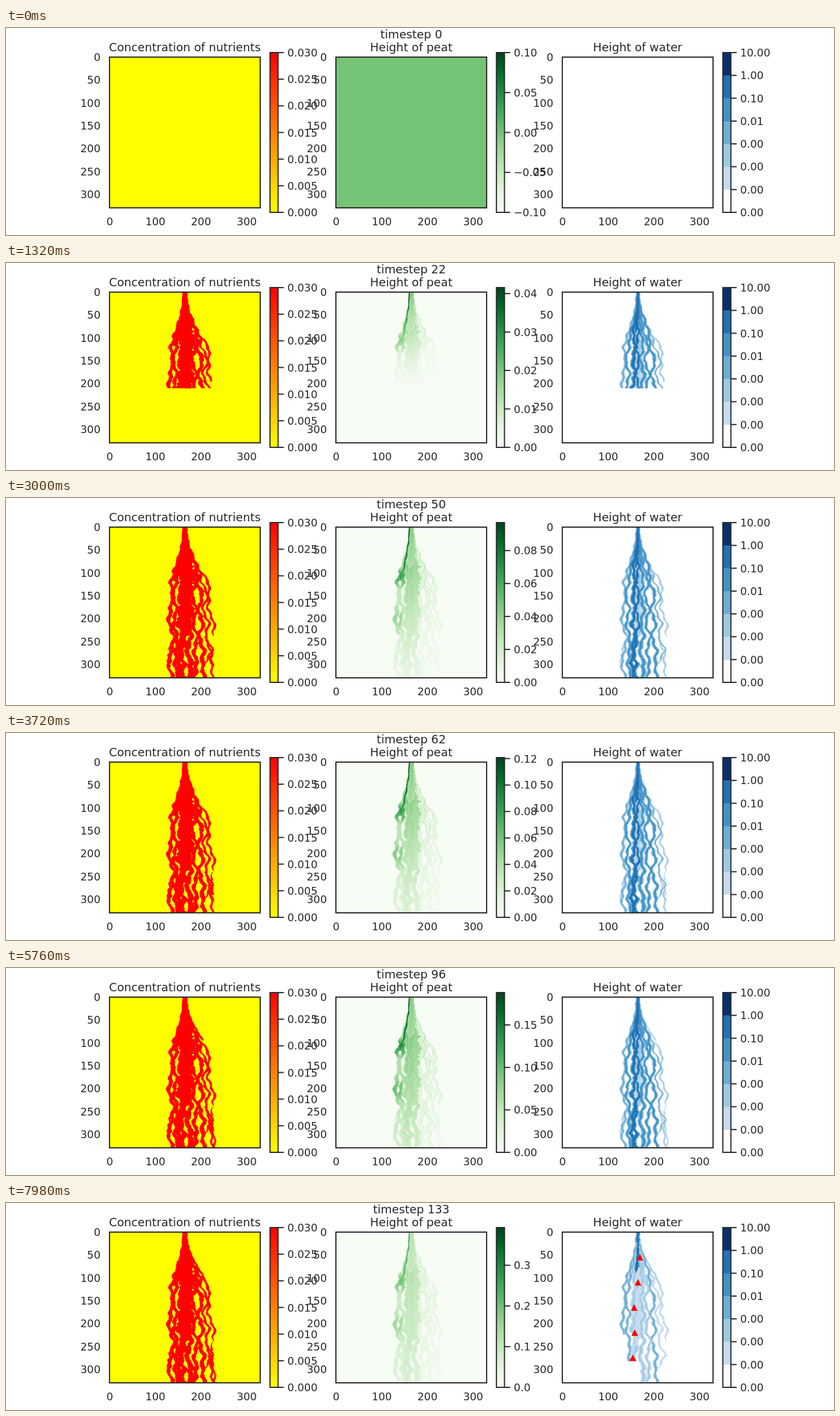
Write an HTML page with a canvas that moves like this. It is 1280x320 px and loops after 8000 ms.

```html
<!DOCTYPE html>
<html lang="en">
<head>
<meta charset="utf-8">
<title>Peat growth</title>
<style>
  html, body { margin: 0; width: 100%; height: 100%; overflow: hidden; background: #fff; }
  canvas, svg { position: absolute; left: 0; top: 0; width: 1280px; height: 320px; }
  text { font: 16.3px "DejaVu Sans", sans-serif; fill: #262626; white-space: pre; }
  .title { font-size: 17.8px; }
  .line { fill: none; stroke: #262626; stroke-width: 1.8; }
</style>
</head>
<body>
<canvas id="maps" width="1280" height="320"></canvas>
<svg id="axes" viewBox="0 0 1280 320"></svg>
<script>
const LOOP = 8000, STEP = 60;
const SIDE = 233, TOP = 45, CELL = SIDE / 330, ROW = SIDE / 11;
const LEFT = [160, 510, 860];
const BAR = { top: 38, height: 247, width: 12.4, offset: 248.2 };
const GREENS = ['#f7fcf5', '#e5f5e0', '#c7e9c0', '#a1d99b', '#74c476', '#41ab5d', '#238b45', '#006d2c', '#00441b'];
const BLUES = ['#fffafa', '#c6dbef', '#9ecae1', '#6baed6', '#4292c6', '#2171b5', '#08306b'];
const DAM_STEP = 100;
const DAM_X = [980, 977, 971, 972, 969];

const ctx = document.getElementById('maps').getContext('2d');
const axes = document.getElementById('axes');

// ---------- helpers ----------
const clamp = (v, a, b) => Math.min(b, Math.max(a, v));
const mix = (a, b, k) => a + (b - a) * k;
const rgb = hex => [1, 3, 5].map(i => parseInt(hex.slice(i, i + 2), 16));
const greenStops = GREENS.map(rgb);

function green(v) {
  const p = clamp(v, 0, 1) * (GREENS.length - 1);
  const i = Math.min(GREENS.length - 2, Math.floor(p));
  const c = greenStops[i].map((a, n) => Math.round(mix(a, greenStops[i + 1][n], p - i)));
  return `rgb(${c})`;
}

function random(seed) {
  return () => {
    seed = (seed * 1664525 + 1013904223) >>> 0;
    return seed / 4294967296;
  };
}

// ---------- channels ----------
// xs: offsets from the centre line, one per row; water: levels before, soon after and long after the dams.
const channels = [];

function channel(xs, options) {
  const c = { row: 0, width: 5, rate: .0008, water: [3, 3, 2], start: 0, speed: 6.75,
              cut: SIDE, hollow: false, wiggle: 1.5, bumps: false, ...options };
  const rnd = random(channels.length * 977 + 41);
  const phase = rnd() * 6.28;
  c.y0 = c.row * ROW;
  c.y1 = c.y0 + (xs.length - 1) * ROW;
  c.edge = [];
  let a = 0, b = 0;
  for (let y = c.y0; y <= c.y1 + .1; y += 1.5) {
    const p = (y - c.y0) / ROW;
    const i = Math.min(xs.length - 2, Math.floor(p));
    const spread = Math.min(1, y / 60);
    const x = mix(xs[i], xs[i + 1], p - i) + c.wiggle * spread * Math.sin(y * .33 + phase);
    const tipA = c.row ? Math.min(1, .3 + (y - c.y0) / 15) : 1;
    const tipB = c.y1 < SIDE - 1 ? Math.min(1, .3 + (c.y1 - y) / 15) : 1;
    const half = c.width / 2 * Math.min(1, .5 + y / 120) * tipA * tipB;
    a = a * .5 + (rnd() - .5) * .6;
    b = b * .5 + (rnd() - .5) * .6;
    c.edge.push([x, y, half * (1 + a), half * (1 + b)]);
  }
  c.shape = {};
  channels.push(c);
}

function shape(c, scale) {
  if (!c.shape[scale]) {
    const path = new Path2D();
    c.edge.forEach(([x, y, l]) => path.lineTo(x - l * scale, y));
    [...c.edge].reverse().forEach(([x, y, , r]) => path.lineTo(x + r * scale, y));
    path.closePath();
    c.shape[scale] = path;
  }
  return c.shape[scale];
}

// right side
channel([8, 20, 36, 37, 35, 45, 43],
  { row: 2, width: 4, rate: .0007, water: [2, 2, 1], speed: 6.3, hollow: true });
channel([43, 38, 44, 46],
  { row: 8, width: 3, rate: .0004, water: [1, 1, 0], start: 50, speed: 3 });
channel([30, 40, 41, 42],
  { row: 8, width: 4, rate: .0005, water: [2, 2, 0], hollow: true });
channel([7, 20, 25, 36, 26, 37, 31, 42, 30],
  { row: 2, width: 4, rate: .0006, water: [3, 2, 1], hollow: true });
channel([4, 12, 25, 36],
  { row: 1, width: 4, rate: .0003, water: [1, 2, 2], start: 45, speed: .9, wiggle: .5 });
channel([0, 3, 10, 17, 18, 27, 19, 28, 21, 29, 26, 29],
  { width: 6.5, rate: .0007, water: [4, 4, 3], hollow: true });
channel([0, 2, 6, 9, 17, 9, 19, 11, 20, 13, 18, 14],
  { width: 6, rate: .0007, water: [4, 3, 2], hollow: true });
// left side
channel([-17, -23, -27],
  { row: 8, width: 4, rate: .0009, water: [2, 0, 0], hollow: true });
channel([0, -3, -8, -15, -22, -19, -23, -25, -17, -21, -26, -19],
  { width: 5.5, rate: .0009, water: [3, 3, 3], cut: 158, bumps: true });
channel([0, -2, -6, -12, -14, -20, -13, -19, -13, -13, -16, -10],
  { width: 6.5, rate: .0008, water: [4, 4, 3], cut: 200, bumps: true });
// core
channel([0, -1, 1, 0, -1, 1, 2],
  { row: 2, width: 20, rate: .001, water: [2, 2, 1], cut: 165, wiggle: 1 });
channel([0, 1, 3, 5, 8, 3, 10, 4, 9, 2, 9, 7],
  { width: 8.5, rate: .0009, water: [4, 3, 2] });
channel([0, -1, -4, -8, -3, -8, -3, -9, -3, -5, -11, -2],
  { width: 9, rate: .001, water: [5, 4, 2], cut: 200 });
channel([0, 0, -3, 1, -4, 2, -4, 2, -4, -9, -3, -9],
  { width: 9, rate: .001, water: [5, 3, 1], cut: 200 });
channel([0, 0, -1, -3],
  { width: 13, rate: .0008, water: [5, 5, 5], wiggle: .4 });
channel([-3.5, -4.5, -8, -12, -19],
  { width: 2.6, rate: .0019, water: [0, 0, 0], wiggle: .6 });

// ---------- maps ----------
function front(c, step) {
  const from = c.start ? c.y0 : 0;
  return from + c.speed * (step - c.start);
}

function fillTo(c, scale, limit, color) {
  if (limit <= c.y0) return;
  ctx.save();
  ctx.beginPath();
  ctx.rect(-120, 0, 240, Math.min(SIDE, limit));
  ctx.clip();
  ctx.fillStyle = color;
  ctx.fill(shape(c, scale));
  ctx.restore();
}

function panel(i, background, draw) {
  ctx.save();
  ctx.translate(LEFT[i], TOP);
  ctx.fillStyle = background;
  ctx.fillRect(0, 0, SIDE, SIDE);
  ctx.translate(117, 0);
  draw();
  ctx.restore();
}

function peatColor(c, step, vmax, gain) {
  const g = ctx.createLinearGradient(0, 0, 0, SIDE);
  const from = c.start ? c.y0 : 0;
  for (let i = 0; i <= 22; i++) {
    const y = i * SIDE / 22;
    const age = Math.max(0, step - c.start - (y - from) / c.speed);
    const bump = c.bumps ? Math.exp(-(((y - 78) / 10) ** 2)) + .8 * Math.exp(-(((y - 145) / 18) ** 2)) : 0;
    const height = c.rate * (1 - .35 * y / SIDE) * (1 + 1.1 * bump) * age;
    g.addColorStop(i / 22, green(height * gain / vmax));
  }
  return g;
}

function waterLevel(c, step) {
  const [a, b, d] = c.water;
  if (step <= DAM_STEP) return a;
  return Math.round(step < 113 ? mix(a, b, (step - DAM_STEP) / 13) : mix(b, d, (step - 113) / 20));
}

function drawWater(step) {
  [.9, .66, .36].forEach((scale, pass) => {
    for (const c of channels) {
      const level = waterLevel(c, step);
      if (level < 1) continue;
      const drained = SIDE - Math.max(0, step - DAM_STEP) * 6.75;
      const limit = Math.min(front(c, step), Math.max(c.cut, drained));
      fillTo(c, scale, limit, BLUES[Math.max(1, level - 2 + pass)]);
    }
  });
}

function drawDams() {
  ctx.fillStyle = '#f00';
  DAM_X.forEach((x, i) => {
    const y = TOP + 55 * (i + 1) * CELL;
    ctx.beginPath();
    ctx.moveTo(x, y - 5.2);
    ctx.lineTo(x + 5.2, y + 5.2);
    ctx.lineTo(x - 5.2, y + 5.2);
    ctx.fill();
  });
}

function bar(i, colors) {
  const x = LEFT[i] + BAR.offset;
  const g = ctx.createLinearGradient(0, BAR.top + BAR.height, 0, BAR.top);
  colors.forEach((c, n) => g.addColorStop(n / (colors.length - 1), c));
  ctx.fillStyle = g;
  ctx.fillRect(x, BAR.top, BAR.width, BAR.height);
}

function drawMaps(step, vmax) {
  ctx.fillStyle = '#fff';
  ctx.fillRect(0, 0, 1280, 320);
  panel(0, '#ff0', () => {
    for (const c of channels) fillTo(c, 1, front(c, step), '#f00');
  });
  panel(1, step ? GREENS[0] : GREENS[4], () => {
    if (!step) return;
    for (const c of channels) {
      const limit = front(c, step);
      fillTo(c, 1, limit, peatColor(c, step, vmax, 1));
      if (c.hollow) fillTo(c, .6, limit, peatColor(c, step, vmax, .45));
      else if (c.width > 6) fillTo(c, .4, limit, peatColor(c, step, vmax, 1.12));
    }
  });
  panel(2, '#fff', () => drawWater(step));
  if (step >= DAM_STEP) drawDams();
  bar(0, ['#ff0', '#f00']);
  bar(1, GREENS);
  BLUES.forEach((c, n) => {
    const h = BAR.height / BLUES.length;
    ctx.fillStyle = c;
    ctx.fillRect(LEFT[2] + BAR.offset, BAR.top + BAR.height - (n + 1) * h, BAR.width, h + .3);
  });
}

// ---------- axes ----------
function add(parent, tag, attrs, content = '') {
  const el = document.createElementNS('http://www.w3.org/2000/svg', tag);
  for (const k in attrs) el.setAttribute(k, attrs[k]);
  el.textContent = content;
  parent.appendChild(el);
  return el;
}

function label(parent, x, y, content, anchor = 'start', cls = '') {
  return add(parent, 'text', { x, y, 'text-anchor': anchor, class: cls }, content);
}

function barTick(parent, i, share, content) {
  const x = LEFT[i] + BAR.offset + BAR.width;
  const y = BAR.top + BAR.height * (1 - share);
  add(parent, 'path', { class: 'line', d: `M${x} ${y}h8.9` });
  label(parent, x + 14.3, y + 6, content);
}

['Concentration of nutrients', 'Height of peat', 'Height of water'].forEach((name, i) => {
  const x = LEFT[i];
  label(axes, x + SIDE / 2, 36, name, 'middle', 'title');
  add(axes, 'rect', { class: 'line', x, y: TOP, width: SIDE, height: SIDE });
  add(axes, 'rect', { class: 'line', x: x + BAR.offset, y: BAR.top, width: BAR.width, height: BAR.height });
  for (let v = 0; v <= 300; v += 50) {
    const at = (v + .5) * CELL;
    label(axes, x - 14, TOP + at + 5.7, v, 'end');
    if (v % 100 === 0) label(axes, x + at, 304.8, v, 'middle');
  }
});
for (let n = 0; n <= 6; n++) barTick(axes, 0, n / 6, (n * .005).toFixed(3));
for (let n = 0; n <= 7; n++) barTick(axes, 2, n / 7, (10 ** (n - 6)).toFixed(2));
const heading = label(axes, LEFT[1] + SIDE / 2, 16, '', 'middle', 'title');
const peatTicks = add(axes, 'g', {});

function tickSize(range) {
  const raw = range / 7;
  const power = 10 ** Math.floor(Math.log10(raw));
  return power * [1, 2, 2.5, 5, 10].find(m => m * power >= raw - 1e-9);
}

function drawPeatTicks(min, max) {
  peatTicks.textContent = '';
  const size = tickSize(max - min);
  let digits = 0;
  while (Math.abs(size * 10 ** digits - Math.round(size * 10 ** digits)) > 1e-6) digits++;
  for (let n = Math.ceil(min / size - 1e-6); n * size <= max + 1e-9; n++) {
    const text = (n * size).toFixed(digits).replace('-', '\u2212');
    barTick(peatTicks, 1, (n * size - min) / (max - min), text);
  }
}

// ---------- playback ----------
const peatMax = step => step
  ? Math.max(.002, .00198 * step - .002, .0119 * (step - DAM_STEP))
  : .1;

let shown = -1;
function render(now) {
  const step = Math.floor((now % LOOP) / STEP);
  if (step !== shown) {
    shown = step;
    const vmax = peatMax(step);
    heading.textContent = 'timestep ' + step;
    drawPeatTicks(step ? 0 : -vmax, vmax);
    drawMaps(step, vmax);
  }
}

const begin = performance.now();
function tick() {
  render(performance.now() - begin);
  requestAnimationFrame(tick);
}
tick();
</script>
</body>
</html>
```
